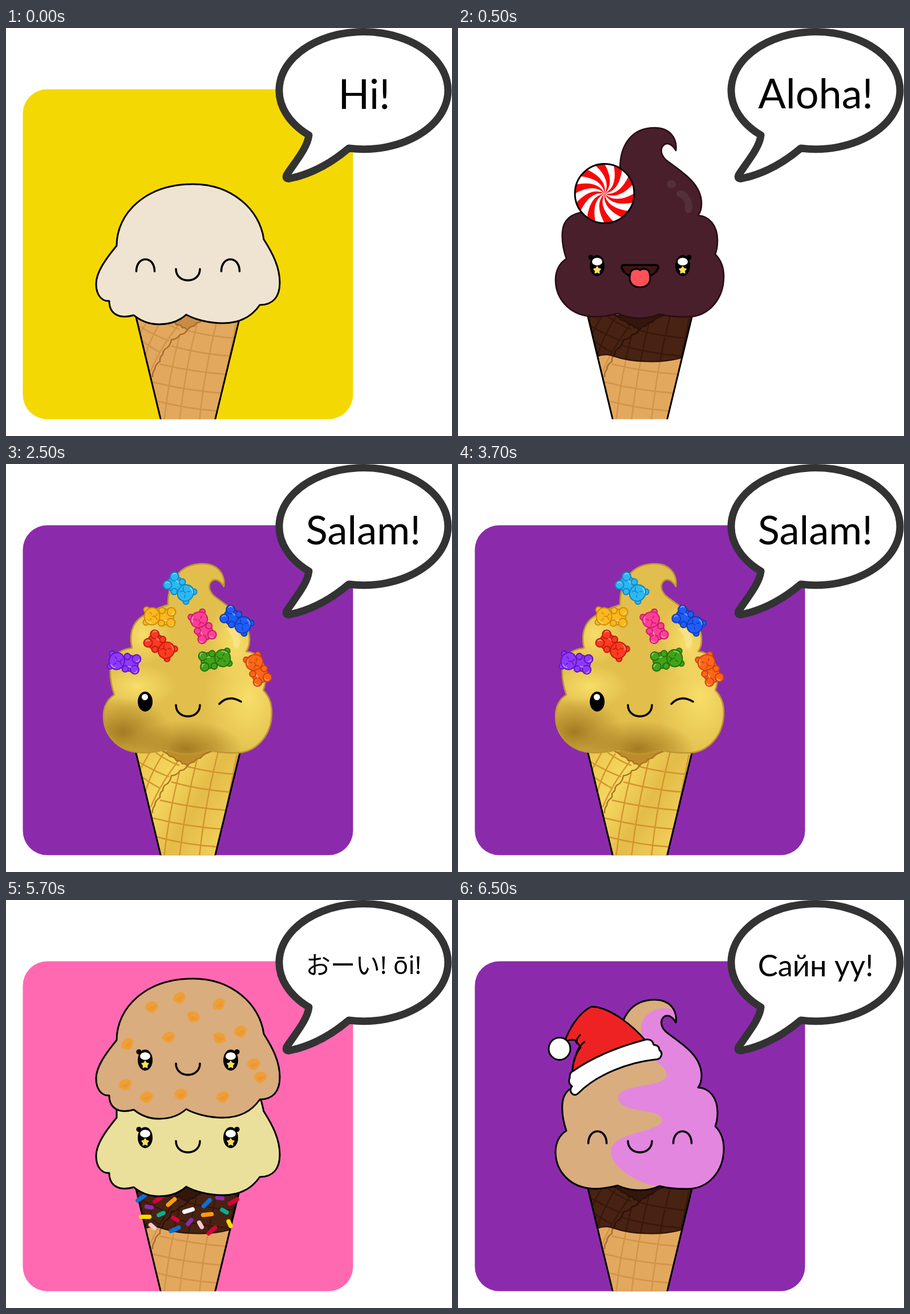
Write an HTML page that moves like this. It is 782 by 716 pixels and loops after 8 s.

```html
<!DOCTYPE html>
<html lang="en">
<head>
<meta charset="utf-8">
<title>Ice cream greetings</title>
<style>
html, body { margin: 0; width: 100%; height: 100%; overflow: hidden; background: #fff; }
svg { display: block; width: 782px; height: 716px; }
.ink { fill: none; stroke: #000; stroke-width: 3.6; stroke-linecap: round; stroke-linejoin: round; }
text { text-anchor: middle; font-family: Lato, Carlito, sans-serif; }
.cjk { font-family: "Noto Sans", "Noto Sans CJK JP", sans-serif; }
</style>
</head>
<body>
<svg id="stage" viewBox="0 0 782 716"></svg>
<script>
const SCOOP = 'M194 382C194 325 245 274 328 274C395 274 445 318 452 371C468 396 480 420 480 447C480 472 468 486 445 486C430 508 408 518 380 518C355 518 330 511 316 503C305 513 290 520 268 520C250 520 235 513 224 504C200 511 181 503 181 479C166 480 158 466 158 449C158 428 176 404 194 382Z';
const SWIRL = 'M284 247C284 203 306 175 345 175C371 175 385 193 382 215C375 203 366 200 360 206C353 214 357 226 368 234C392 252 427 273 427 308C427 317 425 324 421 329C441 330 455 347 455 373C455 384 453 392 451 397C460 406 466 420 466 436C466 475 440 507 402 507C385 507 368 506 353 502C340 508 324 510 312 509C299 508 289 505 280 501C266 505 245 508 230 506C195 502 171 475 171 442C171 426 178 412 190 405C183 385 182 372 183 358C184 338 198 325 221 323C215 297 222 272 250 262C262 254 272 251 284 247Z';
const CONE = 'M227 503L272 690H366L411 503Z';
const DIP_EDGE = 'C355 589 305 587 273 576C264 572 254 573 245 576';
const BUBBLE = 'M601 211A148 103 0 1 0 531 188C529 210 506 236 492 258Q489 266 498 264C532 257 568 239 601 211Z';
const SMILE = 'M298 423C298 449.5 340 449.5 340 423';

const path = (d, attrs = '') => `<path d="${d}" ${attrs}/>`;
const ink = (d, attrs = '') => path(d, 'class="ink" ' + attrs);
const oval = (x, y, rx, ry, fill, more = '') =>
  `<ellipse cx="${x}" cy="${y}" rx="${rx}" ry="${ry}" fill="${fill}" ${more}/>`;
const group = (body, attrs) => `<g ${attrs}>${body}</g>`;
const shift = (body, y) => group(body, `transform="translate(0 ${y})"`);
const outlined = (fill, line = '#000', w = 3) =>
  `fill="${fill}" stroke="${line}" stroke-width="${w}" stroke-linejoin="round"`;

function waffle(fill, line, crack, shade) {
  const down = 'M304 541Q286 610 277 690M336 514Q314 600 304 690M372 505Q348 600 339 690M405 510Q386 600 374 680';
  const across = 'M318 531Q360 542 408 545M290 558Q340 572 396 576M270 590Q330 604 390 608M256 621Q320 637 382 641M262 654Q320 669 372 672';
  const flap = 'M231 522Q262 540 286 549M237 548Q256 562 270 569M276 508Q252 545 244 577M252 506Q242 524 234 538M303 520Q270 562 254 602M262 506Q284 522 304 529';
  const fold = 'M274 504q10 4 13 9q8 0 12 8q7-2 10 5q6-1 9 4q5-7 12-7q3-7 11-7q6-8 20-12';
  const seam = 'M318 529q-4 9-13 9q-4 8-15 9q-2 10-7 14q-8 3-8 12q-6 4-5 12q-9 6-9 14q-5 6-4 14';
  return path(CONE, `fill="${fill}"`)
    + path(fold + 'Z', `fill="${shade}"`)
    + path(down + across + flap, `fill="none" stroke="${line}" stroke-width="2.4"`)
    + path(fold + seam, `fill="none" stroke="${crack}" stroke-width="2.4" stroke-linejoin="round"`);
}

function cone(dipped, gold) {
  let body = gold
    ? waffle('url(#goldCone)', '#d2942f', '#a8741f', '#bd8c2a')
    : waffle('#e2a85e', '#d19349', '#a56c31', '#c98c43');
  if (dipped) {
    body += group(waffle('#482213', '#371809', '#2a1008', '#33160c'), 'clip-path="url(#dip)"')
      + path('M391 579' + DIP_EDGE, 'fill="none" stroke="#2a1108" stroke-width="2"');
  }
  return group(body, 'clip-path="url(#cone)"')
    + path('M227 503L272 690M411 503L366 690', 'fill="none" stroke="#000" stroke-width="3"');
}

const scoop = fill => path(SCOOP, outlined(fill));

const happy = () => ink('M228.5 427C228.5 399 260.5 399 260.5 427M377.5 427C377.5 399 409.5 399 409.5 427') + ink(SMILE);

function star(x, y, r) {
  let d = '';
  for (let i = 0; i < 10; i++) {
    const a = (i / 5 - 0.5) * Math.PI, q = i % 2 ? r * 0.55 : r;
    d += (i ? 'L' : 'M') + (x + q * Math.cos(a)).toFixed(1) + ' ' + (y + q * Math.sin(a)).toFixed(1);
  }
  return path(d + 'Z', outlined('#f8e05a', '#f8e05a', 2));
}

const starEye = (x, side) => oval(x, 417, 13, 18.5, '#000') + oval(x + side * 11, 402.5, 4.6, 4.6, '#000')
  + oval(x, 410, 9, 6.8, '#fff') + star(x, 425, 6);
const starEyes = () => starEye(244, -1) + starEye(394, 1);

function candy(x, y, r) {
  const at = (q, a) => (x + q * Math.cos(a)).toFixed(1) + ' ' + (y + q * Math.sin(a)).toFixed(1);
  const n = 10, step = 2 * Math.PI / n, twist = 0.8;
  let d = '';
  for (let i = 0; i < n; i++) {
    const a = Math.PI / 2 + (i - 0.5) * step, b = a + step / 2;
    d += `M${x} ${y}Q${at(r * 0.5, a + twist)} ${at(r, a)}A${r} ${r} 0 0 1 ${at(r, b)}Q${at(r * 0.5, b + twist)} ${x} ${y}Z`;
  }
  return oval(x, y, r, r, '#fff') + path(d, 'fill="#f80808"') + oval(x, y, r, r, 'none', 'stroke="#000" stroke-width="3"');
}

function bear([x, y, turn, fill, line]) {
  const edge = `stroke="${line}" stroke-width="2"`;
  const pair = (px, py, r) => oval(px, py, r, r, fill, edge) + oval(px, -py, r, r, fill, edge);
  const body = pair(23, 11, 5) + oval(-9, 0, 16, 14, fill, edge) + pair(-20.5, 9.5, 7.5) + pair(-4, 11, 5.5)
    + oval(13, 0, 13.5, 15, fill, edge)
    + path('M17 -7l-3 3M17 7l-3-3M13 0h-5M8 0q-3 2-4 5M8 0q-3-2-4-5', `fill="none" stroke="${line}" stroke-width="1.6" stroke-linecap="round"`)
    + path('M-25 -11q0-4 4-4M-25 9q0-4 4-4M22 -8q-3-4-8-4M-8 -6h-6', 'fill="none" stroke="#fff" stroke-opacity=".45" stroke-width="1.8" stroke-linecap="round"');
  return group(body, `transform="translate(${x} ${y}) rotate(${turn})"`);
}

const bears = [
  [305, 218, 40, '#2cb8f5', '#1287c0'], [269, 268, 183, '#fbb91e', '#d08c0a'],
  [344, 285, -115, '#ff3f97', '#c81d6b'], [405, 275, 35, '#1f5dfb', '#123cae'],
  [271, 319, 38, '#ff3a20', '#bd1c0c'], [207, 348, 190, '#8f38ff', '#5f16c0'],
  [367, 343, -10, '#40a31a', '#26700b'], [441, 360, -115, '#ff671a', '#cc4306']
];

const hues = { b: '#0872d4', r: '#d6003c', o: '#ff9c0d', p: '#8b2bb0', t: '#00b090', y: '#ffda00', w: '#fff', k: '#f7c8d2' };
const sprinkles = [
  ['b', 237, 523, -35], ['r', 267, 525, -35], ['o', 290, 530, -40], ['p', 251, 539, 8],
  ['t', 272, 551, -25], ['y', 244, 556, 0], ['w', 320, 545, -17], ['r', 297, 560, 30],
  ['p', 322, 565, -50], ['k', 257, 573, 40], ['b', 296, 578, -25], ['o', 353, 552, -5],
  ['k', 341, 570, 60], ['r', 361, 580, -42], ['y', 392, 568, 65], ['t', 383, 546, 30],
  ['b', 352, 532, -45], ['p', 375, 523, 8], ['r', 399, 529, -30]
];
const sprinkle = ([hue, x, y, turn]) => {
  const h = 'rowby'.includes(hue) && turn <= 0 ? 7.5 : 4.5;
  return path(`M${-h} 0H${h}`, `transform="translate(${x} ${y}) rotate(${turn})" stroke="${hues[hue]}" stroke-width="7.5" stroke-linecap="round"`);
};

const nuts = [
  [255, 188, 0], [304, 172, -15], [373, 183, -25], [328, 205, 40], [285, 241, -5], [213, 253, -30], [374, 242, 35],
  [411, 231, -10], [434, 288, 5], [446, 311, 10], [209, 324, -10], [246, 346, 0], [306, 341, 10], [380, 346, -10]
];
const nut = ([x, y, turn]) => group(
  path('M-12 1Q-9-9 1-10Q9-10 12-2Q9 7 2 10Q-7 10-12 1Z', 'fill="#ef9f37"')
  + path('M-7 2Q0-2 8-3Q6 4 0 6Z', 'fill="#ea982f"'),
  `transform="translate(${x} ${y}) rotate(${turn})"`);

function plain() {
  return cone() + scoop('#efe4d1') + happy();
}

function chocolate() {
  const shine = oval(374, 274, 8, 7, '#54303d')
    + path('M384 287Q396 280 406 297Q416 315 407 324Q398 328 398 314Q397 299 386 296Q381 291 384 287Z', 'fill="#54303d"');
  const mouth = ink('M291 416H347Q352 416 351 421C347 432 335 438 319 438C303 438 291 432 287 421Q286 416 291 416Z', 'style="fill:#3d1612"')
    + ink('M302 431Q303 424 311 423Q316 422 319 425Q323 422 328 423Q335 424 336 431C340 446 332 455 319 455C306 455 298 446 302 431Z', 'style="fill:#ff5157;stroke-width:3"');
  return cone(true) + path(SWIRL, outlined('#491f2c', '#2a0c14', 2.6)) + shine
    + candy(257, 290.5, 52) + starEyes() + mouth;
}

function golden() {
  const tone = (x, y, rx, ry, id) => oval(x, y, rx, ry, `url(#${id})`);
  const tones = tone(425, 410, 80, 110, 'light') + tone(400, 310, 50, 70, 'light')
    + tone(230, 390, 70, 40, 'light') + tone(240, 300, 50, 55, 'light')
    + tone(205, 470, 85, 60, 'dark') + tone(315, 500, 100, 50, 'dark');
  return cone(false, true) + path(SWIRL, 'fill="#e2be4c"') + group(tones, 'clip-path="url(#swirl)"')
    + path('M386 289Q398 283 407 298Q414 315 406 324Q398 325 399 313Q397 300 386 289Z', 'fill="#f8e68f" opacity=".8"')
    + path(SWIRL, outlined('none', '#bd972f', 2.6))
    + bears.map(bear).join('')
    + oval(244, 417, 13, 17.5, '#000') + oval(243.5, 409, 5.5, 5.5, '#fff')
    + ink('M374 421Q390 404 412 417') + ink(SMILE);
}

function double() {
  const face = starEyes() + ink(SMILE);
  return cone(true) + group(sprinkles.map(sprinkle).join(''), 'clip-path="url(#wide)"')
    + path('M194 340V382C176 404 158 428 158 449C158 466 166 480 181 479C181 503 200 511 224 504C235 513 250 520 268 520C290 520 305 513 316 503C330 511 355 518 380 518C408 518 430 508 445 486C468 486 480 472 480 447C480 420 468 396 452 371Q449 355 443 340Z', outlined('#eae09c'))
    + shift(scoop('#d9ad7e'), -136) + nuts.map(nut).join('') + face + shift(face, -136);
}

function festive() {
  const pink = path('M390 198L368 190C343 188 321 204 321 226C321 260 345 284 357 291Q366 299 366 307C364 330 281 322 281 347C281 376 358 364 358 386C358 408 268 406 268 441C268 470 318 500 358 504L490 530V198Z', 'fill="#e386df"');
  const hat = path('M200 306C201 284 206 270 215 258Q210 251 205 246Q196 243 186 251C194 228 210 199 234 187C268 188 308 222 330 248Z', outlined('#ee2222'))
    + ink('M222 249Q213 255 208 268M208 251Q207 244 214 237', 'style="stroke-width:3"')
    + oval(178, 261, 19, 19.5, '#fff', 'stroke="#000" stroke-width="3"')
    + path('M202 300C240 273 290 255 329 245Q341 243 343 254Q353 255 353 263Q359 268 356 274Q354 280 345 280C300 285 245 305 211 339Q205 345 199 339Q195 332 200 327Q192 321 196 312Q195 303 202 300Z', outlined('#fff'));
  return cone(true) + path(SWIRL, 'fill="#d9ad7e"') + group(pink, 'clip-path="url(#swirl)"')
    + path(SWIRL, outlined('none')) + hat + happy();
}

// until: end of the scene in ms
const scenes = [
  { until: 500, card: '#f4d804', draw: plain, say: 'Hi!', size: 72, x: 628, y: 142 },
  { until: 2500, card: '#fff', draw: chocolate, say: 'Aloha!', size: 72, x: 627, y: 141 },
  { until: 4500, card: '#8b2bac', draw: golden, say: 'Salam!', size: 70.5, x: 626.5, y: 141 },
  { until: 6500, card: '#ff69b2', draw: double, say: 'おーい! ōi!', size: 43.5, x: 627, y: 130, font: 'cjk' },
  { until: 8000, card: '#8b2bac', draw: festive, say: 'Сайн уу!', size: 52.5, x: 627, y: 134 }
];

const clip = (id, d) => `<clipPath id="${id}">${path(d)}</clipPath>`;
const glow = (id, color, alpha) => `<radialGradient id="${id}"><stop offset="0" stop-color="${color}" stop-opacity="${alpha}"/><stop offset="1" stop-color="${color}" stop-opacity="0"/></radialGradient>`;
const defs = '<defs>' + clip('cone', CONE) + clip('dip', 'M220 495H420V576L391 579' + DIP_EDGE + 'H220Z') + clip('swirl', SWIRL)
  + clip('wide', 'M220 500H420V600H220Z') + clip('card', 'M0 0H782V686.5H0Z')
  + glow('dark', '#8f6414', 0.75) + glow('light', '#ffe873', 0.75)
  + '<linearGradient id="goldCone" x2="1" y2=".6"><stop offset="0" stop-color="#ecc44c"/><stop offset=".35" stop-color="#f5d75f"/><stop offset=".65" stop-color="#e4bc48"/><stop offset="1" stop-color="#f1d05a"/></linearGradient></defs>';

const render = s => group(
  `<rect x="29.5" y="107.5" width="579" height="579" rx="43" fill="${s.card}"/>`
  + group(s.draw(), 'clip-path="url(#card)"')
  + path(BUBBLE, outlined('#fff', '#333', 13))
  + `<text class="${s.font || ''}" x="${s.x}" y="${s.y}" font-size="${s.size}">${s.say}</text>`,
  'class="scene"');

const stage = document.getElementById('stage');
stage.innerHTML = defs + scenes.map(render).join('');
const layers = [...stage.querySelectorAll('.scene')];
const start = performance.now();

function show(now) {
  const t = Math.max(0, now - start) % 8000;
  const current = scenes.findIndex(s => t < s.until);
  layers.forEach((layer, i) => { layer.style.display = i === current ? '' : 'none'; });
  requestAnimationFrame(show);
}
show(start);
</script>
</body>
</html>
```
